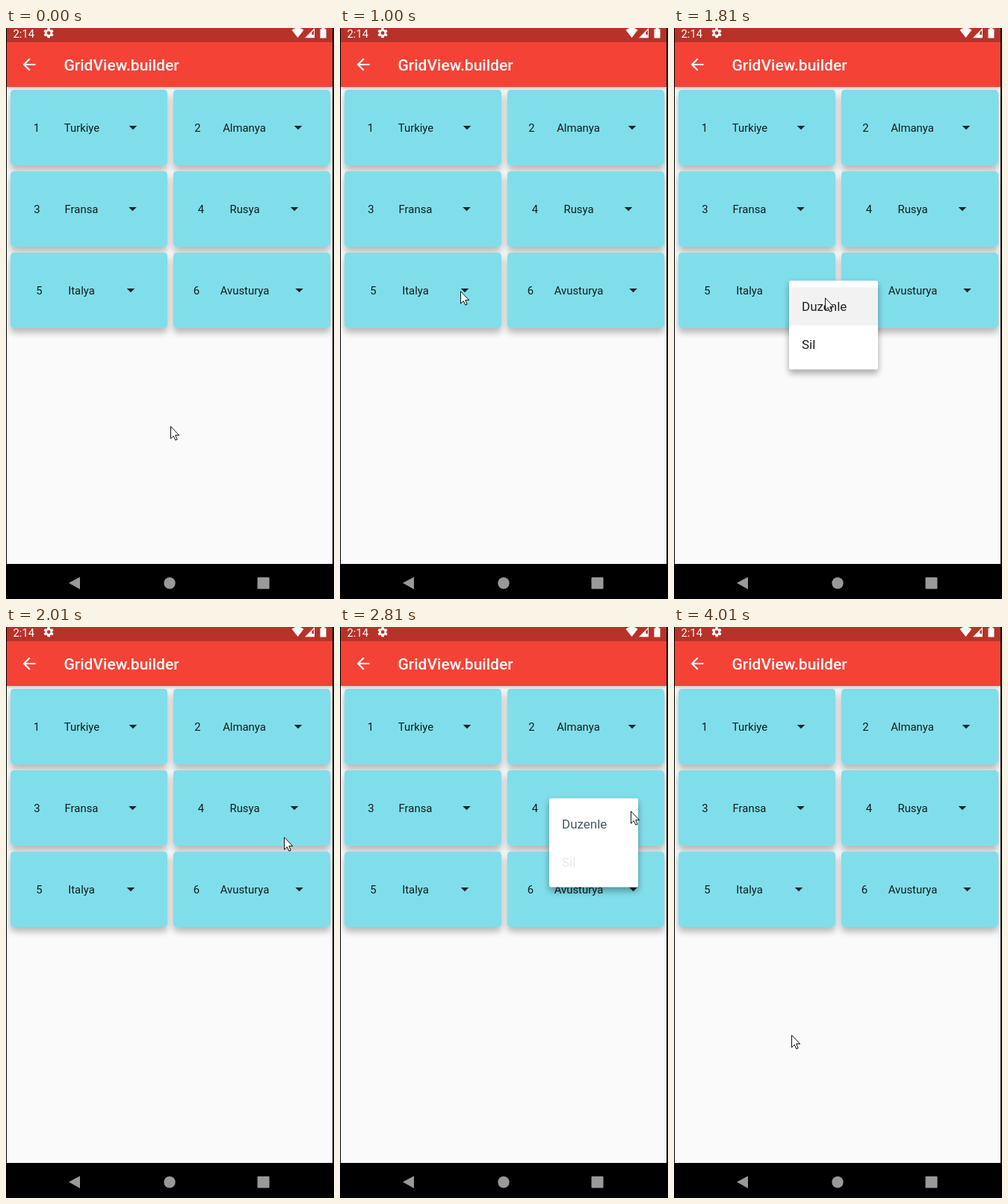
Write an HTML page that moves like this. It is 439 px wide and 765 px high and loops after 4610 ms.

```html
<!DOCTYPE html>
<html lang="tr">
<head>
<meta charset="utf-8">
<title>Grid with popup menus</title>
<style>
html, body { margin: 0; width: 100%; height: 100%; overflow: hidden; background: #000; }
#stage { position: relative; width: 439px; height: 765px; overflow: hidden; background: #000; font-family: Roboto, "Noto Sans", sans-serif; }
#stage div, #stage svg { position: absolute; }
#screen { left: 1px; top: 0; width: 436px; height: 718px; background: #fafafa; overflow: hidden; }
#bar { left: 0; top: 0; width: 436px; height: 79px; background: linear-gradient(#b73229 19px, #f44336 19px); box-shadow: 0 1px 5px rgba(0,0,0,.28); }
.shade, .face { width: 210px; height: 101px; border-radius: 4.5px; }
.shade { box-shadow: 0 7px 9px rgba(0,0,0,.2), 0 2px 11px rgba(0,0,0,.11); }
.face { background: #80deea; }
#menu { left: 0; top: 0; width: 119px; height: 119px; border-radius: 2px; background: #fff; box-shadow: 0 6px 9px rgba(0,0,0,.24), 0 2px 9px rgba(0,0,0,.14); }
#hover { left: 0; width: 119px; height: 51px; background: #f2f2f2; }
svg { left: 0; top: 0; overflow: visible; }
.item { font-size: 17px; }
.label { font-size: 14.87px; text-anchor: middle; fill: rgba(0,0,0,.87); }
</style>
</head>
<body>
<div id="stage">
  <div id="screen"><div id="bar"></div></div>
  <svg id="art" width="439" height="765">
    <g fill="#fff">
      <text x="9.5" y="13" font-size="14.8">2:14</text>
      <path transform="translate(49.2 -1.2) scale(.66)" d="M19.4 13a7.5 7.5 0 0 0 0-2l2.1-1.6a.5.5 0 0 0 .1-.7l-2-3.4a.5.5 0 0 0-.6-.2l-2.5 1a7.3 7.3 0 0 0-1.7-1l-.4-2.6a.5.5 0 0 0-.5-.5h-4a.5.5 0 0 0-.5.5L9 5.1a7.3 7.3 0 0 0-1.7 1l-2.5-1a.5.5 0 0 0-.6.2l-2 3.4a.5.5 0 0 0 .1.7L4.500 11a7.500 7.500 0 0 0 0 2l-2.100 1.600a.5.5 0 0 0-.1.7l2 3.400a.5.5 0 0 0 .6.2l2.500-1a7.300 7.300 0 0 0 1.700 1l.4 2.600a.5.5 0 0 0 .5.5h4a.5.5 0 0 0 .5-.5l.4-2.600a7.300 7.300 0 0 0 1.700-1l2.500 1a.5.5 0 0 0 .6-.2l2-3.400a.5.5 0 0 0-.1-.7zM12 15.600a3.600 3.600 0 1 1 0-7.200 3.600 3.600 0 0 1 0 7.200z"/>
      <path d="M390.500 13L382.500 2.800Q390.500-3.500 398.500 2.800Z"/>
      <path d="M400 13.200L413 0V13.200Z"/>
      <path d="M420.500 1.500H422.500V0H426.500V1.500H428.500V13.500H420.500Z"/>
      <path transform="translate(18.300 36.300) scale(1.062)" d="M20 11H7.830l5.590-5.590L12 4l-8 8 8 8 1.410-1.410L7.830 13H20z"/>
      <text x="77.500" y="57" font-size="21" font-weight="500">GridView.builder</text>
    </g>
    <path d="M409.500 5.500L412 3V9H409.500Z" fill="#b73229"/>
    <g fill="#999">
      <path d="M84 743.500L99 735.500V752Z"/>
      <circle cx="219" cy="743.700" r="7.700"/>
      <rect x="336.500" y="736" width="16" height="15.500" rx="1"/>
    </g>
  </svg>
  <div id="menu">
    <div id="hover"></div>
    <svg width="119" height="119">
      <text class="item" x="17" y="40">Duzenle</text>
      <text class="item" x="17" y="91">Sil</text>
    </svg>
  </div>
  <svg width="439" height="765">
    <g id="pointer">
      <circle id="click" r="12" fill="#ff0" fill-opacity=".47"/>
      <path d="M.5.800V17.200L4.300 13.600L6.800 19.200L9.200 18.200L6.700 12.600H11.700Z" fill="#fff" stroke="#111"/>
    </g>
  </svg>
</div>
<script>
const $ = id => document.getElementById(id);
const LOOP = 4610;

// name, then centres of the number, the name and the arrow
const cards = [
  ['Turkiye', 41, 101.5, 170], ['Almanya', 256.5, 319, 391],
  ['Fransa', 41.5, 101, 169.5], ['Rusya', 261, 319.5, 386],
  ['Italya', 44.5, 101, 167], ['Avusturya', 255, 319.5, 392.5]
];

function addBox(kind, i) {
  const box = document.createElement('div');
  box.className = kind;
  box.style.left = 4.5 + (i % 2) * 218 + 'px';
  box.style.top = 82.5 + (i >> 1) * 109 + 'px';
  $('screen').insertBefore(box, $('bar'));
}

function addSvg(tag, attrs, text = '') {
  const el = document.createElementNS('http://www.w3.org/2000/svg', tag);
  for (const key in attrs) el.setAttribute(key, attrs[key]);
  el.textContent = text;
  $('art').append(el);
}

for (const kind of ['shade', 'face']) cards.forEach((_, i) => addBox(kind, i));
cards.forEach(([name, numX, nameX, arrowX], i) => {
  const y = 138.5 + (i >> 1) * 109;
  addSvg('text', { class: 'label', x: numX, y }, i + 1);
  addSvg('text', { class: 'label', x: nameX, y }, name);
  addSvg('path', { d: `M${arrowX - 5.3} ${y - 7.5}h10.6l-5.3 5.3z`, fill: '#14262a' });
});

const DARK = '#212121';
const low = { x: 154, y: 338.5 }, high = { x: 280, y: 229.5 };
const lowHover = { ...low, hover: 0 }, highHover = { ...high, hover: 1 };

// time, pointer x, pointer y, open menu, click mark
const steps = [
  [0, 220, 533],
  [200, 205, 484],
  [400, 163, 377],
  [600, 161, 353],
  [800, 161, 352, null, true],
  [1000, 161, 352],
  [1200, 168, 361, low],
  [1410, 175, 376, lowHover],
  [1610, 175, 377, lowHover, true],
  [1810, 202, 361, lowHover],
  [2010, 372, 281],
  [2210, 389, 255],
  [2410, 389, 246],
  [2810, 389, 246, { ...high, inks: ['#455a60', '#e9e9e9'] }],
  [3010, 373, 280, high],
  [3210, 310, 321, highHover],
  [3410, 310, 320, highHover, true],
  [3610, 309, 326, { ...highHover, inks: [DARK, '#585858'] }],
  [3810, 187, 512],
  [4010, 157, 546]
];

const items = document.querySelectorAll('.item');
const show = (el, on) => { el.style.visibility = on ? 'visible' : 'hidden'; };

function draw(time) {
  const [, x, y, menu, click] = steps.findLast(step => step[0] <= time);
  $('pointer').setAttribute('transform', `translate(${x} ${y})`);
  show($('click'), click);
  show($('menu'), menu);
  show($('hover'), menu && menu.hover !== undefined);
  if (!menu) return;
  $('menu').style.transform = `translate(${menu.x}px, ${menu.y}px)`;
  $('hover').style.top = 8.5 + 51 * (menu.hover || 0) + 'px';
  items.forEach((item, i) => { item.style.fill = menu.inks ? menu.inks[i] : DARK; });
}

const start = performance.now();
function tick() {
  draw((performance.now() - start) % LOOP);
  requestAnimationFrame(tick);
}
tick();
</script>
</body>
</html>
```
